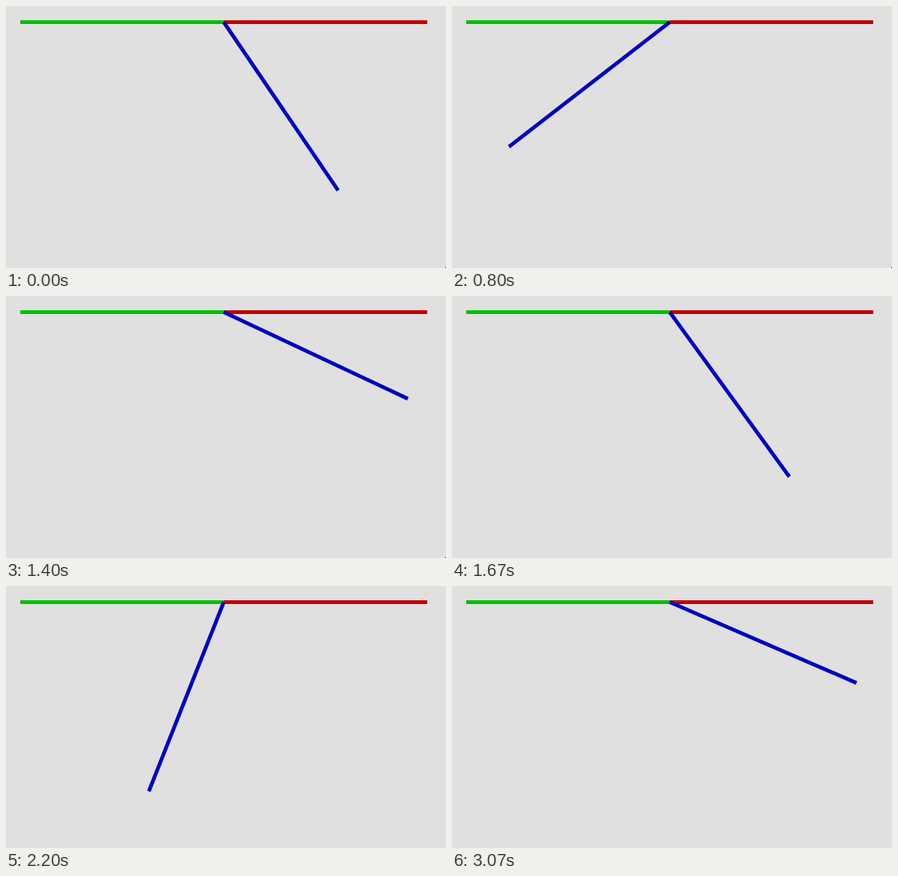
Animation, 586 px wide and 349 px high, one loop 3140 ms. Source, as an HTML page:

```html
<!DOCTYPE html>
<html lang="en">
<head>
<meta charset="utf-8">
<title>Sweeping arm</title>
<style>
  html, body { margin: 0; width: 100%; height: 100%; overflow: hidden; background: #e0e0e0; }
  svg { display: block; width: 586px; height: 349px; }
</style>
</head>
<body>
<svg viewBox="0 0 586 349" fill="none" stroke-width="5">
  <path d="M290 21.5H561" stroke="#c00000"/>
  <path d="M19 21.5H290" stroke="#00c000"/>
  <path id="arm" d="M290 21.5h271" stroke="#0000c0"/>
  <rect id="speck" x="585" y="348" width="1" height="1" fill="#000"/>
</svg>
<script>
  const LOOP = 3140, FPS = 15, LAST_STEP = 46;
  const START_TICK = 31, TICKS_PER_STEP = 4, TICKS_PER_SWEEP = 101, DEG_PER_TICK = 1.8;
  const SPECK_STEPS = 23;
  const arm = document.getElementById("arm");
  const speck = document.getElementById("speck");

  // Step starts are rounded to hundredths of a second.
  function stepAt(ms) {
    const t = Math.floor((ms % LOOP) / 10) * 10;
    return Math.min(LAST_STEP, Math.floor((t + 5) * FPS / 1000));
  }

  function draw(ms) {
    const step = stepAt(ms);
    const tick = (START_TICK + step * TICKS_PER_STEP) % TICKS_PER_SWEEP;
    arm.setAttribute("transform", `rotate(${tick * DEG_PER_TICK} 290 21.5)`);
    speck.setAttribute("visibility", step < SPECK_STEPS ? "visible" : "hidden");
  }

  let start;
  function loop(now) {
    start ??= now;
    draw(now - start);
    requestAnimationFrame(loop);
  }
  draw(0);
  requestAnimationFrame(loop);
</script>
</body>
</html>
```
